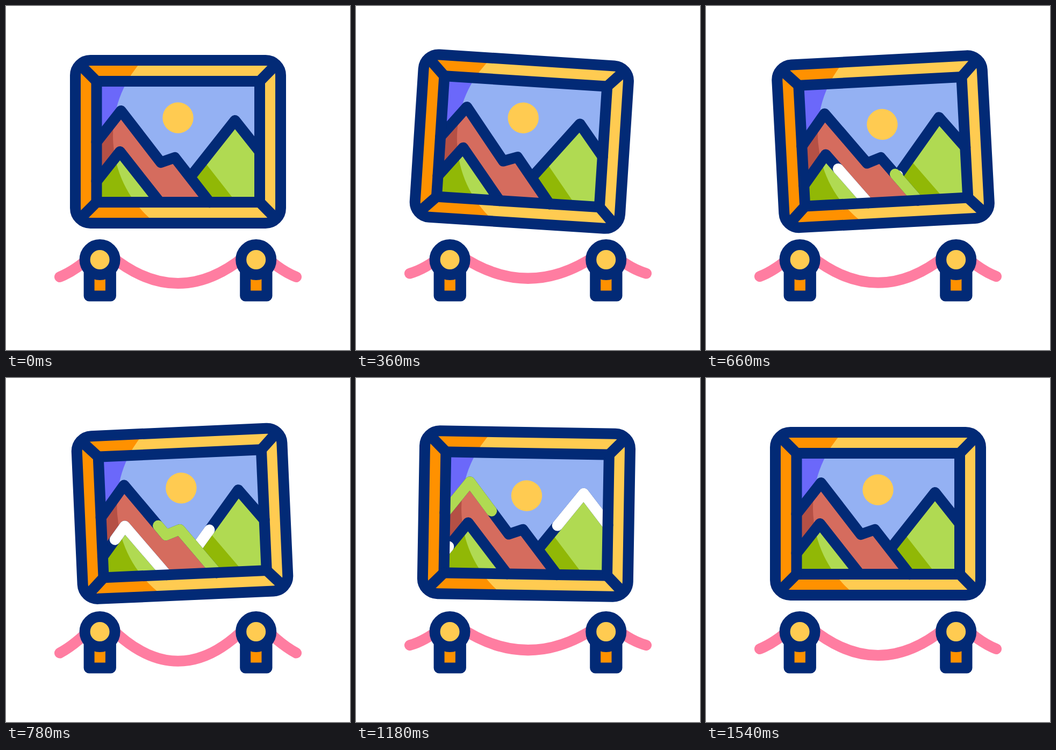
An HTML page for the animation above (1660 ms loop, 640 by 640 pixels).

```html
<!DOCTYPE html>
<html lang="en">
<head>
<meta charset="utf-8">
<title>Gallery</title>
<style>
  html, body { margin: 0; width: 100%; height: 100%; overflow: hidden; background: #fff; }
  svg { display: block; width: 100vw; height: 100vh; }
  .line { fill: none; stroke: #022a76; stroke-width: 20; stroke-linecap: round; stroke-linejoin: round; }
  .white { stroke: #fff; }
  .lime { stroke: #b0da52; }
  .rope { stroke: #ff7da1; }
</style>
</head>
<body>
<svg viewBox="0 0 640 640">
  <defs>
    <clipPath id="lit"><circle cx="405.7" cy="241.4" r="206.7"/></clipPath>
    <clipPath id="canvas"><rect x="168.5" y="140" width="303.5" height="225"/></clipPath>
    <path id="right" d="M343 318L426 213L472 271"/>
    <path id="middle" d="M379 365.3L314 282L288 291L214 195L168.5 253"/>
    <path id="left" d="M286 365L212 271L168.5 326"/>
    <g id="post">
      <path class="line" style="fill:#ff9100" d="M-20 492V539.5H20.3V492Z"/>
      <circle class="line" style="fill:#ffcb51" cy="472" r="28"/>
    </g>
  </defs>

  <g id="frame">
    <rect x="129" y="101" width="382" height="303" rx="28" fill="#ff9100"/>
    <rect x="129" y="101" width="382" height="303" rx="28" fill="#ffcb51" clip-path="url(#lit)"/>
    <rect x="168.5" y="140" width="303.5" height="225" fill="#6b68fa"/>
    <rect x="168.5" y="140" width="303.5" height="225" fill="#94b1f3" clip-path="url(#lit)"/>
    <circle id="sun" cx="320" cy="208" r="28.7" fill="#ffcb51"/>

    <path fill="#b0da52" d="M343 318L426 213L472 271V365H379Z"/>
    <path fill="#91b806" d="M343 318L367 287L428 365H379Z"/>
    <use href="#right" class="line"/>
    <g clip-path="url(#canvas)"><path id="rightGlow" class="line white"/></g>

    <path id="rock" fill="#b55045" d="M379 365L314 282L288 291L214 195L168.5 253V365Z"/>
    <use href="#rock" id="rockLit"/>
    <path fill="#d56c5e" clip-path="url(#lit)" d="M379 365L314 282L288 291L214 195L168.5 253V365Z"/>
    <use href="#middle" class="line"/>
    <g clip-path="url(#canvas)"><path id="middleGlow" class="line lime"/></g>

    <path fill="#91b806" d="M286 365L212 271L168.5 326V365Z"/>
    <path fill="#b0da52" clip-path="url(#lit)" d="M286 365L212 271L168.5 326V365Z"/>
    <use href="#left" class="line"/>
    <g clip-path="url(#canvas)"><path id="leftGlow" class="line white"/></g>

    <g class="line">
      <rect x="168.5" y="140" width="303.5" height="225" stroke-linejoin="miter" style="stroke-linejoin:miter"/>
      <rect x="129" y="101" width="382" height="303" rx="28"/>
      <path d="M168.5 140L140 111.500M472 140L500 111.500M168.500 365L140 393.500M472 365L500 393.500"/>
    </g>
  </g>

  <path id="rope" class="line rope"/>
  <use href="#post" x="174.6"/>
  <use href="#post" x="465.200"/>
</svg>
<script>
  const LOOP = 1660;
  const $ = id => document.getElementById(id);
  const ease = u => u * u * (3 - 2 * u);
  const ramp = (t, from, span) => ease(Math.min(1, Math.max(0, (t - from) / span)));

  // Keys are [time, value], eased between neighbours.
  const swing = [[200, 0], [414, 4.35], [693, -3.3], [1058, 2], [1344, -0.6], [1540, 0]];
  const sag = [[200, 0], [532, -19.4], [760, 11], [1130, -10.2], [1540, 0]];
  const bob = [[340, 0], [560, 19], [900, -11.8], [1180, 11], [1480, 0]];

  // Each glow grows along its ridge, then its tail catches up.
  const glows = [
    { ridge: 'left', head: [434, 490], tail: [835, 411] },
    { ridge: 'middle', head: [488, 606], tail: [904, 507] },
    { ridge: 'right', head: [639, 491], tail: [1040, 411] }
  ];

  for (const g of glows) {
    g.el = $(g.ridge + 'Glow');
    g.el.setAttribute('d', $(g.ridge).getAttribute('d'));
    g.el.setAttribute('pathLength', 1);
  }
  $('rockLit').remove();

  function at(keys, t) {
    let value = keys[0][1];
    for (let i = 1; i < keys.length; i++) {
      const [t0, a] = keys[i - 1], [t1, b] = keys[i];
      if (t >= t0) value = a + (b - a) * ramp(t, t0, t1 - t0);
    }
    return value;
  }

  function ropePath(s) {
    const end = 504 + 0.7 * s, bend = 493 + 0.35 * s, dip = 567 + 2 * s;
    return `M100 ${end}Q128 ${bend} 160 464M195 465Q320 ${dip} 445 465M480 464Q512 ${bend} 540 ${end}`;
  }

  function draw(t) {
    $('frame').setAttribute('transform', `rotate(${at(swing, t)} 320 71)`);
    $('sun').setAttribute('cy', 208 + at(bob, t));
    $('rope').setAttribute('d', ropePath(at(sag, t)));
    for (const { el, head, tail } of glows) {
      const a = ramp(t, ...tail), b = ramp(t, ...head);
      el.style.visibility = b > a ? 'visible' : 'hidden';
      el.style.strokeDasharray = `${b - a} 2`;
      el.style.strokeDashoffset = -a;
    }
  }

  const start = performance.now();
  function tick() {
    draw((performance.now() - start) % LOOP);
    requestAnimationFrame(tick);
  }
  tick();
</script>
</body>
</html>
```
